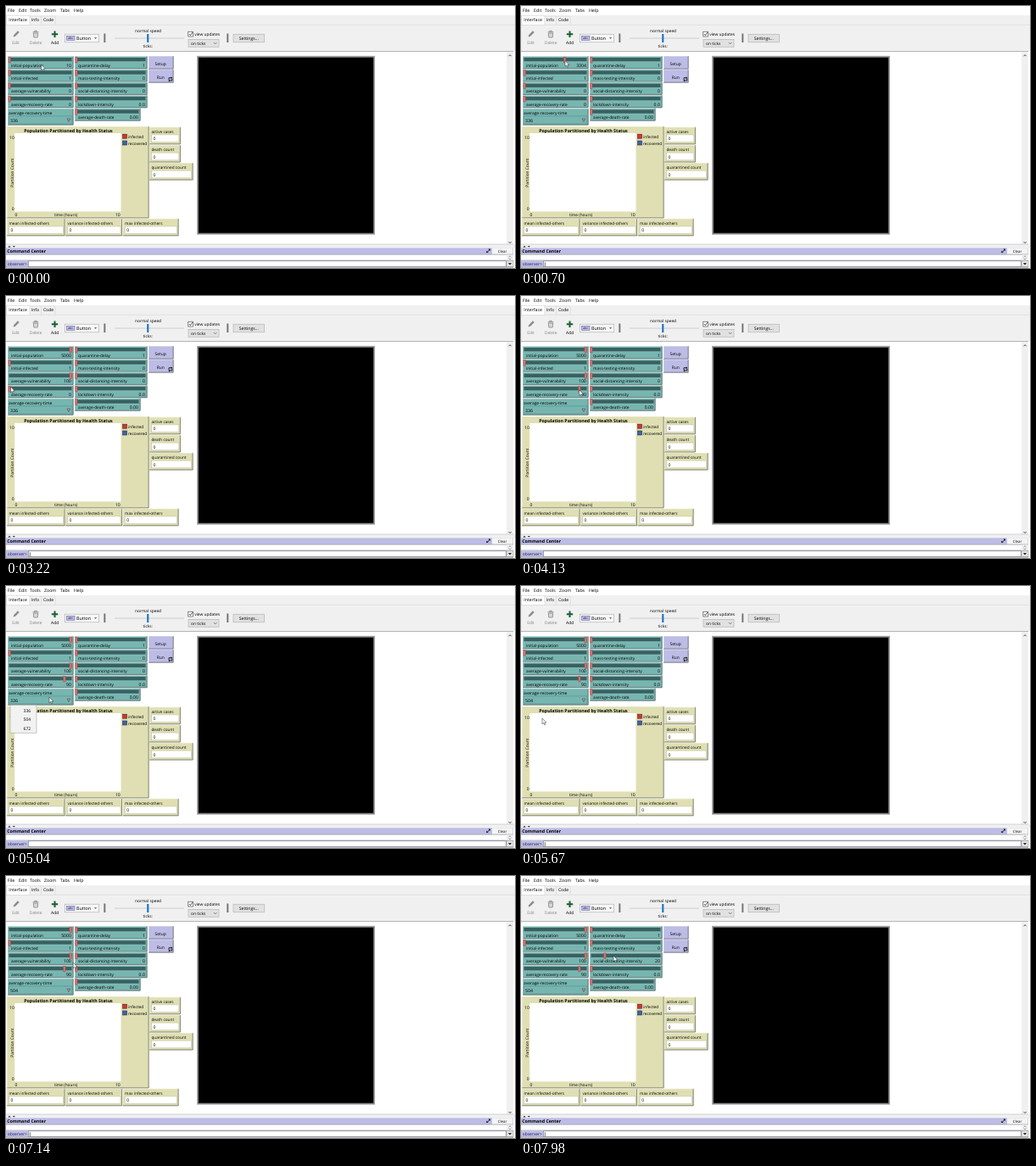
These frames come from a looping animation (600x309 px, 8000 ms). An HTML page:

```html
<!DOCTYPE html>
<html lang="en">
<head>
<meta charset="utf-8">
<title>Epidemic model interface</title>
<style>
html, body { margin: 0; width: 100%; height: 100%; overflow: hidden; background: #fff; }
svg { display: block; width: 100vw; height: 100vh; }
text { font-family: "Open Sans", "Noto Sans", sans-serif; text-rendering: geometricPrecision; white-space: pre; }
</style>
</head>
<body>
<svg id="stage" viewBox="0 0 600 309"></svg>
<script>
const TEAL = '#76b5b0', LILAC = '#bcbce6', SAND = '#dfdfb3', PANEL = '#f0f0f0';
const stage = document.getElementById('stage');

// Markup helpers; boxes are given by their edges.
const box = (x1, y1, x2, y2, fill, stroke) =>
  `<rect x="${x1}" y="${y1}" width="${x2 - x1}" height="${y2 - y1}" fill="${fill}"` +
  (stroke ? ` stroke="${stroke}" stroke-width=".6"` : '') + '/>';
const path = (d, stroke, width = .6, fill = 'none') =>
  `<path d="${d}" stroke="${stroke}" stroke-width="${width}" fill="${fill}"/>`;
const label = (x, y, str, size = 4.8, extra = '') =>
  `<text x="${x}" y="${y}" font-size="${size}" ${extra}>${str}</text>`;
const END = 'text-anchor="end"', MID = 'text-anchor="middle"', BOLD = 'font-weight="700"';
const arrow = (x, y, fill = '#444', r = 1.6, dir = 1) =>
  path(`M${x - r} ${y - dir * r / 2}h${2 * r}l${-r} ${dir * r}z`, 'none', 0, fill);
const raised = (x1, y1, x2, y2, fill) =>
  box(x1, y1, x2, y2, fill) +
  path(`M${x1} ${y2 - .4}H${x2 - .4}V${y1}`, '#6b6b6b', .8) +
  path(`M${x1 + .3} ${y2}V${y1 + .3}H${x2}`, '#fff8', .6);

function menuAndTabs() {
  const menu = [['File', 2], ['Edit', 15], ['Tools', 28], ['Zoom', 45], ['Tabs', 64], ['Help', 80]];
  return menu.map(([s, x]) => label(x, 7.4, s, 5.25)).join('') +
    box(0, 11, 600, 53.5, PANEL) + box(.5, 11.2, 28, 22.5, '#fff', '#d0d0d0') +
    path('M28 12H41.5V22M41.5 12H58V22M28 22.3H600', '#d4d4d4') +
    label(3.3, 18.4, 'Interface', 5.2) + label(29.8, 18.4, 'Info', 5.1) + label(43.9, 18.4, 'Code', 5.1) +
    path('M0 53.5H598', '#a5a5a5', .8);
}

function toolbar() {
  const gray = 'fill="#858585"';
  return path('M8.5 36.5l.8-2.6 4.6-4.6 1.8 1.8-4.6 4.6z', 'none', 0, '#8d8d8d') +
    label(11.5, 45, 'Edit', 4.9, `${MID} ${gray}`) +
    path('M31.5 30.8h7M33.7 30.5v-1.2h2.6v1.2M32.3 32h5.4l-.5 5h-4.4z', '#8d8d8d', .9) +
    path('M34 32.5v4M36 32.5v4', '#8d8d8d', .5) +
    label(35.2, 45, 'Delete', 4.9, `${MID} ${gray}`) +
    path('M57.5 29.5v7.4M53.8 33.2h7.4', '#17602f', 2) +
    label(57.6, 45, 'Add', 4.9, MID) +
    box(69.5, 33.2, 109.5, 42.8, '#f7f7f7', '#aaa') +
    box(71.3, 35.3, 81, 40.3, LILAC, '#6a6a9c') + label(76.1, 39.3, 'abc', 3.7, `${MID} fill="#26264a"`) +
    label(83, 39.9, 'Button', 5.4) + arrow(105.5, 38) +
    box(115.3, 32.5, 117.3, 43, '#777') +
    label(167.6, 30.5, 'normal speed', 4.8, MID) +
    box(128, 37.4, 210, 38.7, '#d6d6d6') + box(166.2, 33, 168.3, 43, '#1874c9') +
    label(167.2, 49.2, 'ticks:', 4.8, MID) +
    box(214.8, 30.2, 220.6, 36, '#fff', '#333') + path('M215.8 33l1.5 1.6 2.5-3.4', '#222', .8) +
    label(222.2, 34.8, 'view updates', 4.9) +
    box(215, 39.3, 251, 48.2, '#e1e1e1', '#adadad') + label(218, 45.5, 'on ticks', 4.9) +
    path('M244.8 43l1.8 1.8 1.8-1.8', '#555', .7) +
    box(260.3, 32.5, 262.3, 43, '#777') +
    box(268, 33.2, 304.5, 42.8, '#e1e1e1', '#adadad') + label(286.3, 39.8, 'Settings...', 5.1, MID);
}

function slider(id, x, y, right, name, value, origin) {
  return raised(x, y, right, y + 14.9, TEAL) +
    box(x + 1.5, y + 1.8, right - 2, y + 6.3, '#386060') +
    path(`M${x + 1.5} ${y + 6.5}H${right - 2}`, '#a8d3d0', .4) +
    `<g id="${id}-knob">${box(origin - 1, y + 1, origin + 1.2, y + 7.7, '#dc7472', '#ad5250')}</g>` +
    label(x + 4, y + 12.3, name) +
    label(right - 2.7, y + 12.3, value, 5.1, `${END} id="${id}-value"`);
}

function sliders() {
  const rowY = i => 59.2 + i * 15.35;
  const left = [['population', 'initial-population', 10], ['infected', 'initial-infected', 1],
    ['vulnerability', 'average-vulnerability', 0], ['recovery', 'average-recovery-rate', 0]];
  const right = [['delay', 'quarantine-delay', 1], ['testing', 'mass-testing-intensity', 0],
    ['distancing', 'social-distancing-intensity', 0], ['lockdown', 'lockdown-intensity', '0.0'],
    ['death', 'average-death-rate', '0.00']];
  return left.map(([id, name, v], i) => slider(id, 2, rowY(i), 79.5, name, v, 4)).join('') +
    right.map(([id, name, v], i) => slider(id, 81, rowY(i), i == 4 ? 158.5 : 166.5, name, v, 82.8)).join('');
}

function chooserAndButtons() {
  return raised(2, 121, 79.5, 140.5, TEAL) + label(3, 127.6, 'average-recovery-time', 4.95) +
    box(3.2, 129.9, 78, 139, TEAL, '#568d89') + label(5, 136.8, '336', 5.2, 'id="chosen"') +
    path('M72 133h3.8l-1.9 3.6z', '#7d4550', .7) +
    raised(168, 59, 197.5, 74.5, LILAC) + label(182.2, 69.5, 'Setup', 4.9, MID) +
    raised(168, 75, 197.5, 90.5, LILAC) + label(182.2, 85.5, 'Run', 4.9, MID) +
    path('M192 86.9v-2.2h3.3M195.8 85.7v2.2h-3.3', '#111', .9) +
    path('M194.6 83.2l1.6 1.5-1.6 1.5zM193 86.4l-1.6 1.5 1.6 1.5z', 'none', 0, '#111');
}

function plot() {
  return raised(1, 142, 168.5, 250.3, SAND) +
    label(73.5, 148.6, 'Population Partitioned by Health Status', 5.25, `${MID} ${BOLD}`) +
    box(10.2, 150, 135.5, 242.4, '#fff') +
    label(9.8, 157, '10', 5, END) + label(9.6, 241, '0', 5, END) +
    label(0, 0, 'Partition Count', 4.8, `${MID} transform="translate(8.8 196.7) rotate(-90)"`) +
    label(10.5, 248, '0', 5) + label(134.7, 248, '10', 5, END) + label(70.5, 248, 'time (hours)', 4.8, MID) +
    box(137.5, 151.2, 142.5, 156.2, '#df3026', '#333') + label(144, 155.8, 'infected') +
    box(137.5, 159, 142.5, 164, '#3a62b4', '#333') + label(144, 163.6, 'recovered');
}

const monitor = (x, y, right, name) =>
  raised(x, y, right, y + 20.4, SAND) + label(x + 2.4, y + 6.8, name, 4.75) +
  box(x + 2.6, y + 9.1, right - 2, y + 17.8, '#fff', '#c4c4a0') + label(x + 4.6, y + 15.6, '0', 5);

function monitors() {
  return monitor(169, 142.8, 205.8, 'active cases') + monitor(169, 164, 205.8, 'death count') +
    monitor(169, 185, 220.5, 'quarantined count') +
    monitor(1, 250.8, 69.5, 'mean infected-others') +
    monitor(70, 250.8, 137, 'variance infected-others') +
    monitor(137.6, 250.8, 203.5, 'max infected-others');
}

function viewAndConsole() {
  return box(225, 58.8, 435, 269.7, '#a6a6a6') + box(226, 59.8, 434, 268.7, '#7c7c7c') +
    box(227, 60.8, 433, 267.7, '#000') + box(590, 54, 598, 281, PANEL) +
    path('M592.5 59.2l1.6-1.6 1.6 1.6M592.5 278l1.6 1.6 1.6-1.6', '#333', .9) +
    box(0, 281, 600, 285.3, PANEL) + path('M0 281H598', '#bbb') +
    arrow(4, 283.7, '#222', 1.7, -1) + arrow(9.3, 283.7, '#222') +
    box(0, 285.3, 598, 293, LILAC) + label(1.2, 290.9, 'Command Center', 5.25, BOLD) +
    path('M567 290.5l3.2-3.2', '#111', 1) +
    path('M568.5 286.6h2.4V289zM566.3 288.7v2.4h2.4z', 'none', 0, '#111') +
    box(573, 285.3, 597.5, 292.7, '#f4f4f4') + label(585, 290.6, 'Clear', 4.4, MID) +
    path('M0 293.2H598M0 300H598', '#8f8f8f') + box(590, 293.5, 598, 299.8, PANEL) +
    path('M592.6 296l1.4-1.2 1.4 1.2M592.6 297.8l1.4 1.2 1.4-1.2', '#555') +
    box(0, 300.2, 598, 308, LILAC) + label(1.8, 305.9, 'observer&gt;', 4.9, 'fill="#1c1c50"') +
    box(26.3, 300.8, 589.5, 307.5, '#fff', '#6f6f78') + box(590, 300.5, 598, 307.8, '#e4e4e4', '#999') +
    arrow(594, 304.2, '#000', 2.1) + path('M0 308.2H598', '#777') +
    `<g id="caret">${path('M28.3 302.2V307', '#111')}</g>`;
}

function overlays() {
  const choices = ['336', '504', '672'].map((s, i) => label(20.5, 148.9 + i * 10.4, s, 5.1)).join('');
  return `<g id="popup">${box(5, 140.3, 36, 173.2, '#f2f2f2', '#a5a5a5')}${choices}</g>` +
    `<g id="cursor">${path('M0 0V6.8L1.6 5.4 2.7 7.8 3.7 7.3 2.7 5H4.8z', '#222', .5, '#fff')}</g>`;
}

stage.innerHTML = box(0, 0, 600, 309, '#fff') + menuAndTabs() + toolbar() + sliders() +
  chooserAndButtons() + plot() + monitors() + viewAndConsole() + overlays();

const LOOP = 8000, STEP = 70;
// Cursor stops: time, x, y.
const route = [[0, 41.5, 69], [280, 5, 64], [700, 52, 64.5], [1050, 76, 65], [1260, 76, 66],
  [1820, 5, 94], [1960, 5, 94], [2240, 26.3, 93.5], [2730, 76, 94], [2870, 74, 95],
  [3220, 5.5, 107], [3430, 5, 109], [4060, 69, 110], [4270, 68, 112], [4690, 51, 131],
  [5110, 51, 131], [5460, 25, 156], [5670, 25, 156], [6230, 42, 148], [6580, 60, 130],
  [7280, 84, 95], [7560, 84, 95], [7980, 109, 94]];
// Slider drags: time, value.
const drags = {
  population: { keys: [[280, 10], [700, 3304], [1050, 5000]], max: 5000, span: 72 },
  vulnerability: { keys: [[1960, 0], [2240, 31], [2730, 100]], max: 100, span: 72 },
  recovery: { keys: [[3430, 0], [4060, 90]], max: 100, span: 72 },
  distancing: { keys: [[7560, 0], [7980, 20]], max: 100, span: 80 }
};
const el = id => document.getElementById(id);

function sample(keys, t) {
  const next = keys.findIndex(k => k[0] > t);
  if (next === 0) return keys[0].slice(1);
  if (next < 0) return keys[keys.length - 1].slice(1);
  const a = keys[next - 1], b = keys[next], p = (t - a[0]) / (b[0] - a[0]);
  return a.slice(1).map((v, i) => v + (b[i + 1] - v) * p);
}

function draw(time) {
  const t = Math.floor(time % LOOP / STEP) * STEP;
  for (const [id, { keys, max, span }] of Object.entries(drags)) {
    const [value] = sample(keys, t);
    el(id + '-value').textContent = Math.round(value);
    el(id + '-knob').setAttribute('transform', `translate(${value / max * span} 0)`);
  }
  const [x, y] = sample(route, t);
  el('cursor').setAttribute('transform', `translate(${x} ${y})`);
  el('popup').style.display = t >= 4830 && t < 5600 ? '' : 'none';
  el('chosen').textContent = t < 5600 ? '336' : '504';
  el('caret').style.display = (t + 640) % 1200 < 600 ? '' : 'none';
}

let start;
function tick(now) {
  start ??= now;
  draw(now - start);
  requestAnimationFrame(tick);
}
draw(0);
requestAnimationFrame(tick);
</script>
</body>
</html>
```
